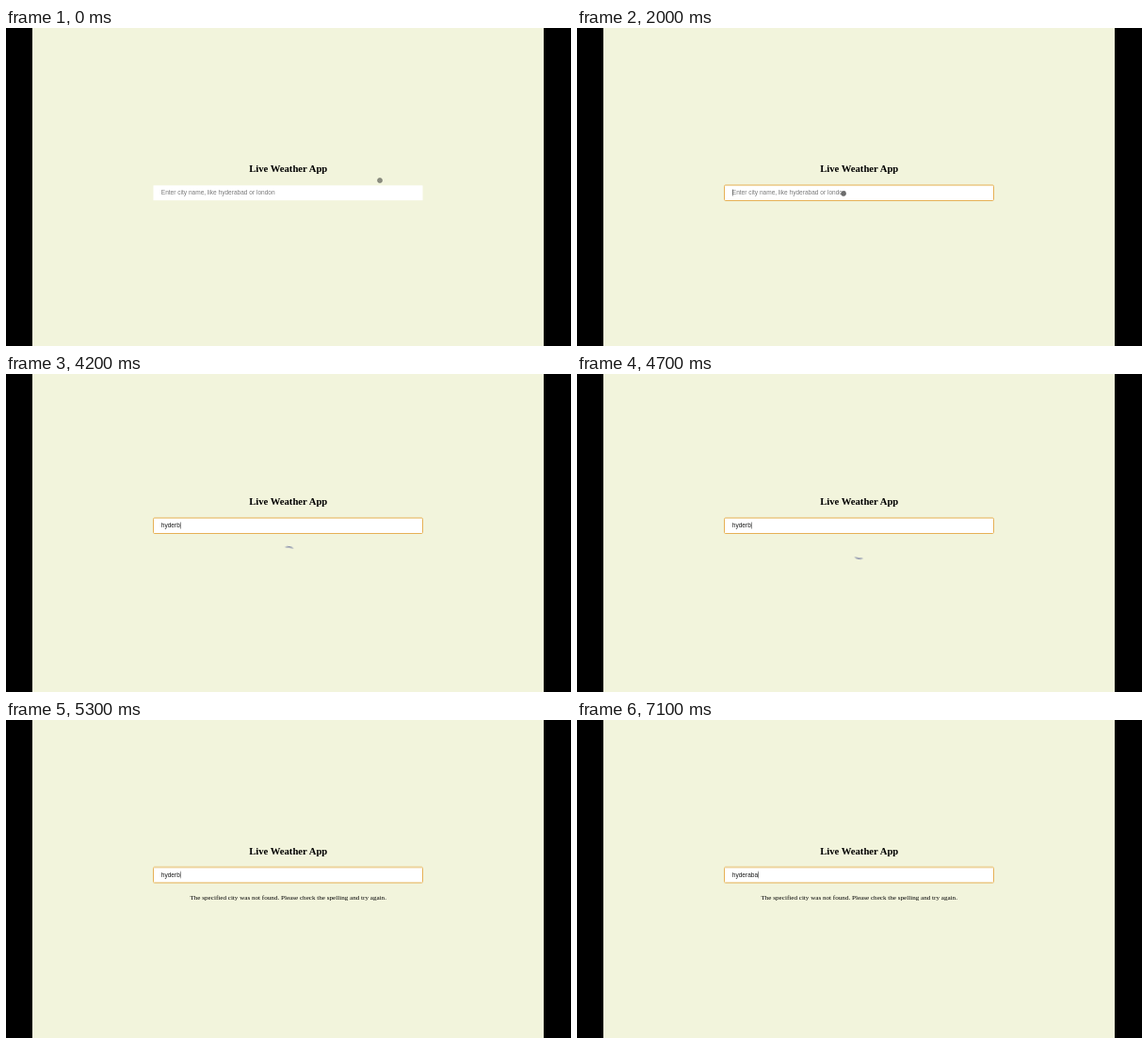
Write an HTML page that moves like this. It is 600 px wide and 338 px high and loops after 8 s.

```html
<!DOCTYPE html>
<html lang="en">
<head>
<meta charset="utf-8">
<title>Live Weather App</title>
<style>
  html, body { margin: 0; width: 100%; height: 100%; overflow: hidden; background: #000; }
  svg { display: block; width: 600px; height: 338px; }

  .page { fill: #f2f4dc; }
  .serif { font-family: "Liberation Serif", "Times New Roman", serif; text-anchor: middle; }
  .title { font-size: 10.67px; font-weight: 700; }
  .message { font-size: 7.11px; }
  .field { font-family: "Liberation Sans", Arial, sans-serif; font-size: 6.56px; }

  .app, .ring, .caret, .message, .spinner, .arc, .pointer {
    animation: 8s step-end infinite;
  }
  .app { animation-name: shift; }
  .ring { fill: none; stroke: #e6b055; animation-name: focus; }
  .caret { fill: #555; animation-name: focus; }
  .message { animation-name: message; }
  .spinner { animation-name: loading; }
  .arc {
    fill: #858ca9;
    transform-origin: 300px 190px;
    animation: spin 1s steps(10) infinite;
  }
  .pointer { fill: #8b8d80; stroke: #74766b; stroke-width: .6; animation-name: pointer; }

  @keyframes shift {
    0% { transform: none; }
    52.5% { transform: translateY(-14px); }
    66.25%, 100% { transform: translateY(-10.5px); }
  }
  @keyframes focus {
    0% { opacity: 0; }
    10% { opacity: .6; }
    11.25%, 100% { opacity: 1; }
  }
  @keyframes loading {
    0% { opacity: 0; }
    52.5% { opacity: 1; }
    66.25%, 100% { opacity: 0; }
  }
  @keyframes message {
    0% { opacity: 0; }
    66.25%, 100% { opacity: 1; }
  }
  /* Phase chosen so the arc stands near the top when loading begins. */
  @keyframes spin {
    from { transform: rotate(-64deg); }
    to { transform: rotate(296deg); }
  }
  @keyframes pointer {
    0% { transform: translate(397px, 162px); }
    2.5% { transform: translate(375px, 157px); }
    3.75% { transform: translate(320px, 151px); }
    5% { transform: translate(255px, 157px); }
    6.25% { transform: translate(237px, 170px); }
    7.5% { transform: translate(283px, 176px); }
    10% { transform: translate(283px, 176px); fill: #6d6d6d; stroke: #606060; }
    35%, 100% { transform: translate(283px, 176px); opacity: 0; }
  }
</style>
</head>
<body>
<svg viewBox="0 0 600 338">
  <rect class="page" x="28" width="543" height="338"/>
  <g class="app">
    <text class="serif title" x="299.7" y="153">Live Weather App</text>
    <rect x="156.5" y="167.3" width="286" height="15.9" fill="#fff"/>
    <rect class="ring" x="156.5" y="167" width="286" height="16.5" rx="1.2"/>
    <text class="field" id="entry" x="164.8" y="177.2"></text>
    <rect class="caret" id="caret" y="171.5" width=".7" height="7"/>
  </g>
  <text class="serif message" x="299.7" y="191.4">The specified city was not found. Please check the spelling and try again.</text>
  <g class="spinner">
    <path class="arc" d="M295 185A7.1 7.1 0 0 1 305 185A25 25 0 0 0 295 185Z"/>
  </g>
  <circle class="pointer" r="2.5"/>
</svg>
<script>
  const hint = "Enter city name, like hyderabad or london";
  const typing = [
    [0, ""], [2000, "h"], [2200, "hy"], [2400, "hyd"], [2600, "hyde"],
    [2800, "hyder"], [2900, "hyderb"], [6000, "hyder"],
    [6700, "hyderab"], [6900, "hyderaba"], [7100, "hyderabad"]
  ];
  const entry = document.getElementById("entry");
  const caret = document.getElementById("caret");
  // The text follows the clock of the CSS animations.
  const clock = caret.getAnimations()[0];
  let shown;

  function draw() {
    const time = (clock.currentTime || 0) % 8000;
    const value = typing.findLast(([start]) => start <= time)[1];
    if (value !== shown) {
      shown = value;
      entry.textContent = value || hint;
      entry.setAttribute("fill", value ? "#1c1c1c" : "#7b7b7b");
      const width = value ? entry.getComputedTextLength() : 0;
      caret.setAttribute("x", 164.9 + width);
    }
    requestAnimationFrame(draw);
  }
  draw();
</script>
</body>
</html>
```
